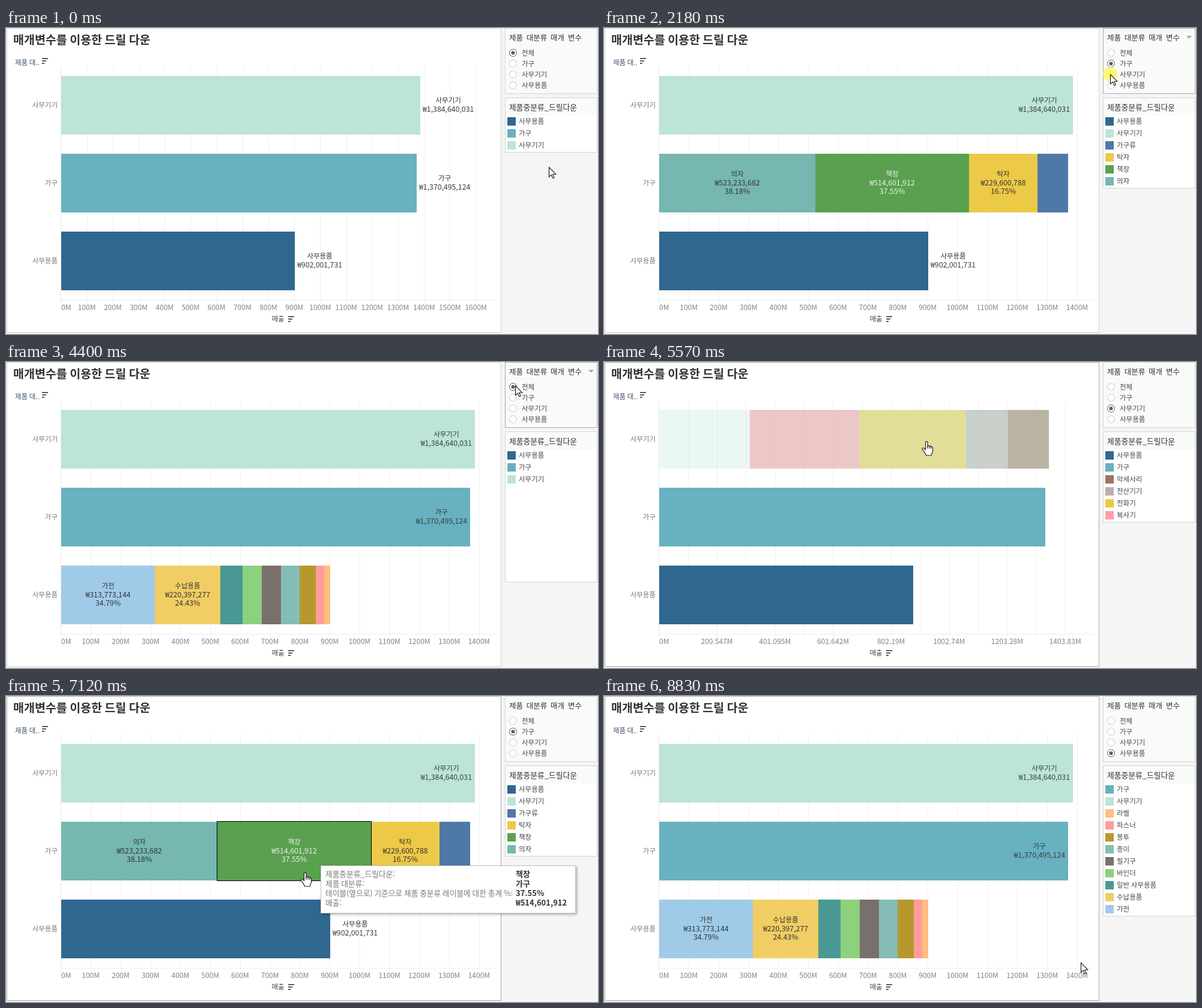
Write an HTML page with a canvas that moves like this. It is 986 px wide and 511 px high and loops after 8900 ms.

```html
<!DOCTYPE html>
<html lang="ko">
<head>
<meta charset="utf-8">
<style>
html, body { margin: 0; width: 100%; height: 100%; overflow: hidden; background: #f5f5f5; }
canvas { display: block; }
</style>
</head>
<body>
<canvas id="stage" width="986" height="511"></canvas>
<script>
const c = document.getElementById('stage').getContext('2d');
const FONT = '"Noto Sans CJK KR", "Noto Sans KR", "Noto Sans CJK", "Noto Sans", sans-serif';
const LOOP = 8900, X0 = 91.65, DURATION = 300;

const rows = [
  { name: '사무기기', color: '#bce4d8', total: 1384640031, y: 80, parts: [
    ['복사기', 504485549, '#ff9da7'], ['전화기', 496081586, '#edc948'],
    ['전산기기', 194112957, '#bab0ac'], ['악세사리', 189959939, '#9c755f', 1]] },
  { name: '가구', color: '#67b1c1', total: 1370495124, y: 210, parts: [
    ['의자', 523233682, '#76b7b2'], ['책장', 514601912, '#59a14f', 1],
    ['탁자', 229600788, '#edc948'], ['가구류', 103058742, '#4e79a7']] },
  { name: '사무용품', color: '#30678f', total: 902001731, y: 340, parts: [
    ['가전', 313773144, '#a0cbe8'], ['수납용품', 220397277, '#f1ce63'],
    ['일반 사무용품', 72631205, '#499894'], ['바인더', 66124870, '#8cd17d'],
    ['필기구', 64318422, '#79706e'], ['종이', 60512348, '#86bcb6'],
    ['봉투', 54297610, '#b6992d'], ['파스너', 28164035, '#ff9d9a'],
    ['라벨', 21782820, '#ffbe7d']] }
];
const options = ['전체', '가구', '사무기기', '사무용품'];
const openRow = [-1, 1, 0, 2]; // option -> drilled row

// click time, transition start, chosen option
const steps = [
  [1090, 1270, 1], [2180, 2400, 2], [3240, 3460, 3], [4140, 4430, 0],
  [5200, 5360, 2], [6300, 6480, 1], [7310, 7440, 3]
];
// time, x, y
const path = [
  [0, 904, 232], [70, 904, 232], [520, 872, 130], [960, 844, 59], [1400, 844, 59],
  [1580, 843, 77], [2480, 843, 77], [2710, 844, 93], [2960, 844, 93], [2970, 847, 96],
  [3770, 847, 96], [3900, 848, 33], [4010, 848, 39], [4900, 848, 39], [5160, 537, 132],
  [6000, 537, 132], [6240, 498, 294], [7185, 498, 294], [7300, 472, 365], [8040, 472, 365],
  [8180, 580, 488], [8350, 792, 445], [8540, 792, 445], [8550, 793, 445],
  [8820, 793, 445], [8830, 794, 445]
];
const tooltips = [[5690, 6030], [6790, 7190], [7740, 8080]];

const ARROW = new Path2D('M0 0V16L3.8 12.6L6.3 18.4L8.7 17.4L6.2 11.7H11.3Z');
const HAND = new Path2D('M-2 2C-2-.5 1.5-.5 1.5 2V8C2 6.5 4.5 6.8 4.5 8.5C5.5 7.3 7.3 7.8 7.3 9.3C8.5 8.5 10 9.3 10 11V16C10 19 8 20 7.5 23.5H-1C-1.5 20-6 16-7.5 12.5C-7.5 10.5-5 10.5-4 12L-2 14Z');
const KNUCKLES = new Path2D('M1.5 8V12M4.5 8.5V12M7.3 9.3V12.5');

const lerp = (a, b, p) => a + (b - a) * p;
const won = v => '₩' + v.toLocaleString('en-US');
const percent = (v, total) => (v / total * 100).toFixed(2) + '%';
const scaleOf = option => option ? 0.4975 : 0.432; // px per million

function text(s, x, y, size = 11.5, color = '#333', align = 'left', weight = 400) {
  c.font = `${weight} ${size}px ${FONT}`;
  c.fillStyle = color;
  c.textAlign = align;
  c.fillText(s, x, y + size * 0.37);
}

function box(x, y, w, h, fill, stroke) {
  c.fillStyle = fill;
  c.fillRect(x, y, w, h);
  if (stroke) {
    c.strokeStyle = stroke;
    c.lineWidth = 1;
    c.strokeRect(x + 0.5, y + 0.5, w - 1, h - 1);
  }
}

function sortIcon(x, y) {
  [10, 7, 4].forEach((w, i) => box(x, y + i * 4, w, 2, '#6a555b'));
}

function cursorAt(t) {
  let i = path.length - 1;
  while (path[i][0] > t) i--;
  const a = path[i], b = path[i + 1] || a;
  const u = b === a ? 0 : (t - a[0]) / (b[0] - a[0]);
  const p = u * u * (3 - 2 * u);
  return [lerp(a[1], b[1], p), lerp(a[2], b[2], p)];
}

// option in force when column `col` of the steps, shifted by `delay`, is reached
function optionAt(t, col, delay) {
  return steps.reduce((now, s) => t >= s[col] + delay ? s[2] : now, 0);
}

function segments(row, open, left, right) {
  const r = rows[row];
  const parts = open ? r.parts : [[r.name, r.total, r.color]];
  let sum = 0;
  return parts.map(([name, value, color, light]) => {
    const x = Math.round(X0 + lerp(left, right, sum / r.total));
    sum += value;
    const end = Math.round(X0 + lerp(left, right, sum / r.total));
    return { name, value, color, light, x, w: end - x, row: r, open };
  });
}

function drawSegments(list, alpha) {
  c.globalAlpha = alpha;
  list.forEach(s => box(s.x, s.row.y, s.w, 98, s.color));
  c.globalAlpha = 1;
}

function drawAxis(from, to, t) {
  const moving = t < 1 && scaleOf(from) !== scaleOf(to);
  const gap = 100 * (moving ? lerp(scaleOf(from), scaleOf(to), t ** 0.69) : scaleOf(to));
  const unit = moving ? 100 * (1 + (1 - t) * 0.0092258) : 100;
  for (let k = 0; 91.4 + k * gap < 800; k++) {
    const x = 91.4 + k * gap;
    box(Math.round(x), 65, 1, 394, k ? '#f1f1f1' : '#e8e8e8');
    if (moving && k % 2) continue;
    const label = Number((k * unit).toPrecision(6)) + 'M';
    text(label, k ? x : 92, 467, 12, '#828282', k ? 'center' : 'left', 300);
  }
  box(92, 454, 724, 1, '#ececec');
}

function drawLabel(s) {
  const mid = s.row.y + 49;
  if (s.open) {
    if (s.w < 80) return;
    const x = s.x + s.w / 2, color = s.light ? '#f0f0f0' : '#333';
    text(s.name, x, mid - 15, 11.5, color, 'center');
    text(won(s.value), x, mid - 1, 12.3, color, 'center', 300);
    text(percent(s.value, s.row.total), x, mid + 13, 12.3, color, 'center', 300);
    return;
  }
  c.font = `300 12.3px ${FONT}`;
  const w = c.measureText(won(s.value)).width, end = s.x + s.w;
  const x = end + w + 4 < 815 ? end + 4 + w / 2 : end - 5 - w / 2;
  text(s.name, x, mid - 8, 11.5, '#333', 'center');
  text(won(s.value), x, mid + 6, 12.3, '#3c3c3c', 'center', 300);
}

function drawChart(t, mx, my) {
  const hovered = mx < 825 && my < 509;
  box(1, 0, 824, 509, '#fff', hovered ? '#a9a9a9' : '#d4d4d4');
  text('매개변수를 이용한 드릴 다운', 12, 20, 19.5, '#333', 'left', 700);
  text('제품 대..', 15, 58, 11.5, '#3f5170');
  sortIcon(60, 50);
  text('매출', 453, 486, 11.5, '#444', 'center');
  sortIcon(470, 481);

  const to = optionAt(t, 1, 0);
  const at = steps.findLastIndex(s => t >= s[1]);
  const from = at > 0 ? steps[at - 1][2] : 0;
  const u = at < 0 ? 1 : Math.min(1, (t - steps[at][1]) / DURATION);
  const p = u ** 1.6;
  drawAxis(from, to, u);

  let hit = null;
  rows.forEach((r, i) => {
    text(r.name, 86, r.y + 49, 11.5, '#787878', 'right');
    const w0 = r.total / 1e6 * scaleOf(from), w1 = r.total / 1e6 * scaleOf(to);
    const was = openRow[from] === i, now = openRow[to] === i;
    const right = lerp(w0, w1, p);
    const changing = u < 1 && was !== now;
    const list = segments(i, now, changing && now ? lerp(0.589 * w0, 0, p) : 0, right);
    drawSegments(list, changing ? u : 1);
    if (changing) drawSegments(segments(i, was, was ? lerp(0, 0.589 * w1, p) : 0, right), 1 - u);
    if (u === 1) list.forEach(drawLabel);
    if (my >= r.y && my <= r.y + 98)
      hit = list.find(s => mx >= s.x && mx < s.x + s.w) || (changing && mx > X0 && mx < X0 + right ? list[0] : hit);
  });
  if (hit && u === 1) {
    c.strokeStyle = '#000';
    c.lineWidth = 1;
    c.strokeRect(hit.x - 0.5, hit.row.y - 0.5, hit.w + 1, 99);
  }
  return hit;
}

function drawOptions(t, mx, my) {
  const hovered = mx > 831 && my < 110;
  box(831, 0, 154, 110, '#f9fafa', hovered ? '#a9a9a9' : '#d4d4d4');
  c.wordSpacing = '3px';
  text('제품 대분류 매개 변수', 838, 16, 12.5, '#333');
  c.wordSpacing = '0px';
  if (hovered) {
    c.fillStyle = '#aaa';
    c.fill(new Path2D('M970 13H979L974.5 18Z'));
  }
  const chosen = optionAt(t, 0, 70);
  options.forEach((name, i) => {
    const y = 41.5 + 18 * i, on = i === chosen;
    c.beginPath();
    c.arc(844.5, y, 6, 0, 7);
    c.fillStyle = '#fff';
    c.fill();
    c.strokeStyle = on ? '#5c5456' : '#c9c9c9';
    c.lineWidth = 1;
    c.stroke();
    if (on) {
      c.beginPath();
      c.arc(844.5, y, 3, 0, 7);
      c.fillStyle = '#66595b';
      c.fill();
    }
    text(name, 859, y + 0.5, 11.5, '#444');
  });
}

function legendItems(option) {
  const open = openRow[option];
  const items = [2, 1, 0].filter(i => i !== open).map(i => [rows[i].name, rows[i].color]);
  if (open >= 0) [...rows[open].parts].reverse().forEach(s => items.push([s[0], s[2]]));
  return items;
}

function drawLegend(t) {
  const items = legendItems(optionAt(t, 1, -40));
  const size = legendItems(optionAt(t, 1, 0)).length;
  const h = 32 + 20 * Math.max(size, items.length);
  box(831, 116, 154, h, '#fff', '#d4d4d4');
  box(832, 117, 152, 29, '#f9fafa');
  text('제품중분류_드릴다운', 838, 132, 12.8, '#333');
  items.forEach(([name, color], i) => {
    box(835, 149 + 20 * i, 14, 14, color);
    text(name, 854, 156 + 20 * i, 11.5, '#444');
  });
}

function drawTooltip(s, mx, my) {
  const x = Math.round(Math.min(mx + 26, 552)), y = Math.round(my - 11);
  c.save();
  c.shadowColor = 'rgba(0,0,0,.3)';
  c.shadowBlur = 4;
  c.shadowOffsetX = c.shadowOffsetY = 2;
  box(x, y, 425, 80, '#fff');
  c.restore();
  box(x, y, 425, 80, '#fff', '#c8c8c8');
  [
    ['제품중분류_드릴다운:', s.name],
    ['제품 대분류:', s.row.name],
    ['테이블(옆으로) 기준으로 제품 중분류 레이블에 대한 총계 %:', percent(s.value, s.row.total)],
    ['매출:', won(s.value)]
  ].forEach(([key, value], i) => {
    text(key, x + 8, y + 14 + 16 * i, 12.7, '#787878');
    text(value, x + 325, y + 14 + 16 * i, 13, '#333', 'left', 700);
  });
}

function drawCursor(x, y, hand) {
  c.save();
  c.translate(Math.round(x) + 0.5, Math.round(y) + 0.5);
  c.fillStyle = '#fff';
  c.strokeStyle = '#111';
  c.lineWidth = 1.1;
  c.fill(hand ? HAND : ARROW);
  c.stroke(hand ? HAND : ARROW);
  if (hand) c.stroke(KNUCKLES);
  c.restore();
}

function frame(now) {
  const t = now % LOOP;
  const [mx, my] = cursorAt(t);
  box(0, 0, 986, 511, '#f5f5f5');
  const hit = drawChart(t, mx, my);
  drawOptions(t, mx, my);
  drawLegend(t);
  if (hit && hit.open && tooltips.some(([a, b]) => t >= a && t < b)) drawTooltip(hit, mx, my);
  if (steps.some(s => t >= s[0] && t < s[0] + 140)) {
    c.beginPath();
    c.arc(mx, my, 12, 0, 7);
    c.fillStyle = 'rgba(255,249,80,.75)';
    c.fill();
  }
  drawCursor(mx, my, hit);
}

const start = performance.now();
(function tick() {
  frame(Math.max(0, performance.now() - start));
  requestAnimationFrame(tick);
})();
</script>
</body>
</html>
```
